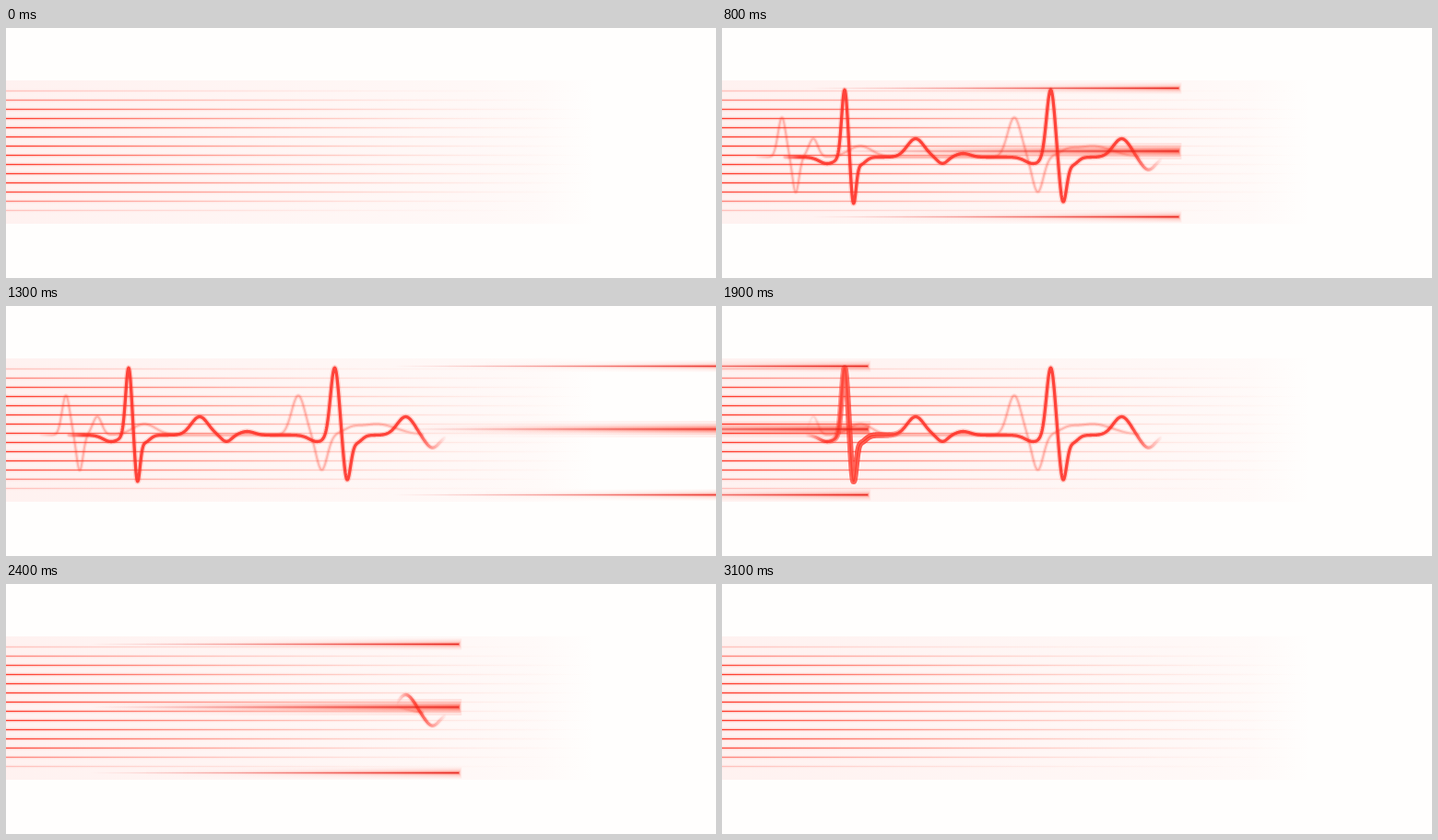
These frames come from a looping animation (770x272 px, 3200 ms). An HTML page with a canvas:

```html
<!DOCTYPE html>
<html lang="en">
<head>
<meta charset="utf-8">
<title>Pulse trace</title>
<style>
html, body { margin: 0; width: 100%; height: 100%; overflow: hidden; background: #fffefd; }
canvas { display: block; }
</style>
</head>
<body>
<canvas id="stage" width="770" height="272"></canvas>
<script>
const W = 770, H = 272, LOOP = 3200, STEP = 100;
const ctx = document.getElementById('stage').getContext('2d');
const clamp = v => Math.max(0, Math.min(1, v));
const red = a => `rgba(255,44,34,${a})`;
const ember = a => `rgba(255,58,38,${a})`;

// The first sweep writes the pulse, the second wipes it
const writer = { start: 100, end: 1500, x: -5, speed: .754, drag: .000056 };
const wiper = { start: 1700, end: 3100, x: 25, speed: .666, drag: 0 };

// One heartbeat as bell curves: offset, height, width; k stretches the spike
const beat = (x, k) => [
  [x - 95, 4, 11], [x - 19, -7, 12],
  [x, 74, 4.6 * k], [x + 9.5 * k, -48, 4 * k], [x + 17 * k, -8, 8],
  [x + 77, 20, 13], [x + 106, -7 * k * k, 8 * k]
];
const echo = (x, k) => [
  [x, 43, 6 * k], [x + 15 * k, -38, 5 * k], [x + 34 * k, 20 / k ** 3, 7 * k], [x + 85, 12, 18 * k]
];
const pulse = curve(68, 476, [...beat(133, 1), ...beat(356.5, 1.4)]);
const ghost = curve(38, 452, [...echo(65, 1), ...echo(317, 1.7)]);

function curve(x0, x1, bells) {
  const path = new Path2D();
  for (let x = x0; x <= x1; x += .5) {
    path.lineTo(x, bells.reduce((y, [c, h, w]) => y - h * Math.exp(-(((x - c) / w) ** 2)), 140.5));
  }
  return path;
}

function ramp(x0, x1, color, shape) {
  const g = ctx.createLinearGradient(x0, 0, x1, 0);
  for (let i = 0; i <= 10; i++) g.addColorStop(i / 10, color(shape(i / 10), i / 10));
  return g;
}

function bar(x0, x1, y, h, fill) {
  ctx.fillStyle = fill;
  ctx.fillRect(x0, y - h / 2, x1 - x0, h);
}

function drawGrid() {
  bar(0, 640, 135, 156, ramp(0, 640, red, u => .058 * Math.sqrt(1 - u)));
  const heat = (a, u) => `rgba(255,${44 + 90 * u},${28 + 80 * u},${a})`;
  for (let i = 0; i < 14; i++) {
    const k = .92 * Math.min(1, .25 + .33 * Math.min(i, 13 - i)), y = 68.5 + i * 10;
    const fade = u => k * (1 - u) ** 1.5;
    bar(0, 640, y, 4, ramp(0, 640, heat, u => .1 * fade(u)));
    bar(0, 640, y, 1.3, ramp(0, 640, heat, fade));
  }
}

function strokeCurve(path, width, style) {
  ctx.lineWidth = width;
  ctx.strokeStyle = style;
  ctx.stroke(path);
}

// Opaque between two places, soft at both ends
function mask(from, to, alpha, color) {
  const g = ctx.createLinearGradient(0, 0, W, 0);
  const stop = (x, a) => g.addColorStop(clamp(x / W), color(a));
  stop(from, 0);
  stop(from + 22, alpha);
  stop(Math.max(from + 22, to - 34), alpha);
  stop(to, 0);
  return g;
}

function drawPulse(from, to) {
  const window = (x0, x1) => [Math.max(from, x0), Math.min(to, x1)];
  const faint = window(34, 466), full = window(62, 478);
  if (full[0] >= full[1]) return;
  strokeCurve(ghost, 4.5, mask(...faint, .12, ember));
  strokeCurve(ghost, 2, mask(...faint, .25, ember));
  strokeCurve(pulse, 6, mask(...full, .2, ember));
  strokeCurve(pulse, 3.3, mask(...full, .85, red));
}

function drawHot(head, from, to) {
  ctx.save();
  ctx.beginPath();
  ctx.rect(from, 0, Math.min(to, 446) - from, H);
  ctx.clip();
  const spot = color => ramp(head - 45, head + 40, color, u => .75 * Math.sin(Math.PI * u));
  strokeCurve(pulse, 6.5, spot(red));
  strokeCurve(pulse, 3.4, spot(a => `rgba(255,130,112,${a})`));
  strokeCurve(pulse, 1.6, spot(red));
  ctx.restore();
}

function drawSweep(head, alpha) {
  ctx.save();
  ctx.globalAlpha = alpha;
  const tail = head - 400;
  for (const y of [65.5, 134, 205.5]) {
    const mid = y === 134 ? 1.5 : 1;
    for (const h of [12, 8, 5, 3]) {
      const a = mid * .9 / h;
      bar(tail, head + h / 4, y, h * mid, ramp(tail, head, ember, u => a * u ** (2.4 / mid)));
    }
    bar(tail, head, y, 1.3, ramp(tail, head, a => `rgba(228,32,26,${a})`, u => .95 * u));
  }
  ctx.restore();
}

function draw(now) {
  const t = Math.floor((now + 1) / STEP) * STEP % LOOP;
  ctx.fillStyle = '#fffefd';
  ctx.fillRect(0, 0, W, H);
  ctx.lineJoin = ctx.lineCap = 'round';
  drawGrid();

  const wiping = t >= wiper.start, pass = wiping ? wiper : writer;
  const u = t - pass.start;
  if (u >= 0 && t < wiper.end) {
    const head = pass.x + pass.speed * u - pass.drag * u * u;
    const from = wiping ? head - 68 : 0;
    const to = wiping ? W : head + 48;
    drawPulse(from, to);
    if (t < pass.end) {
      drawHot(head, from, to);
      drawSweep(head, clamp((pass.end - t) / 200));
    }
  }
  requestAnimationFrame(draw);
}
requestAnimationFrame(draw);
</script>
</body>
</html>
```
